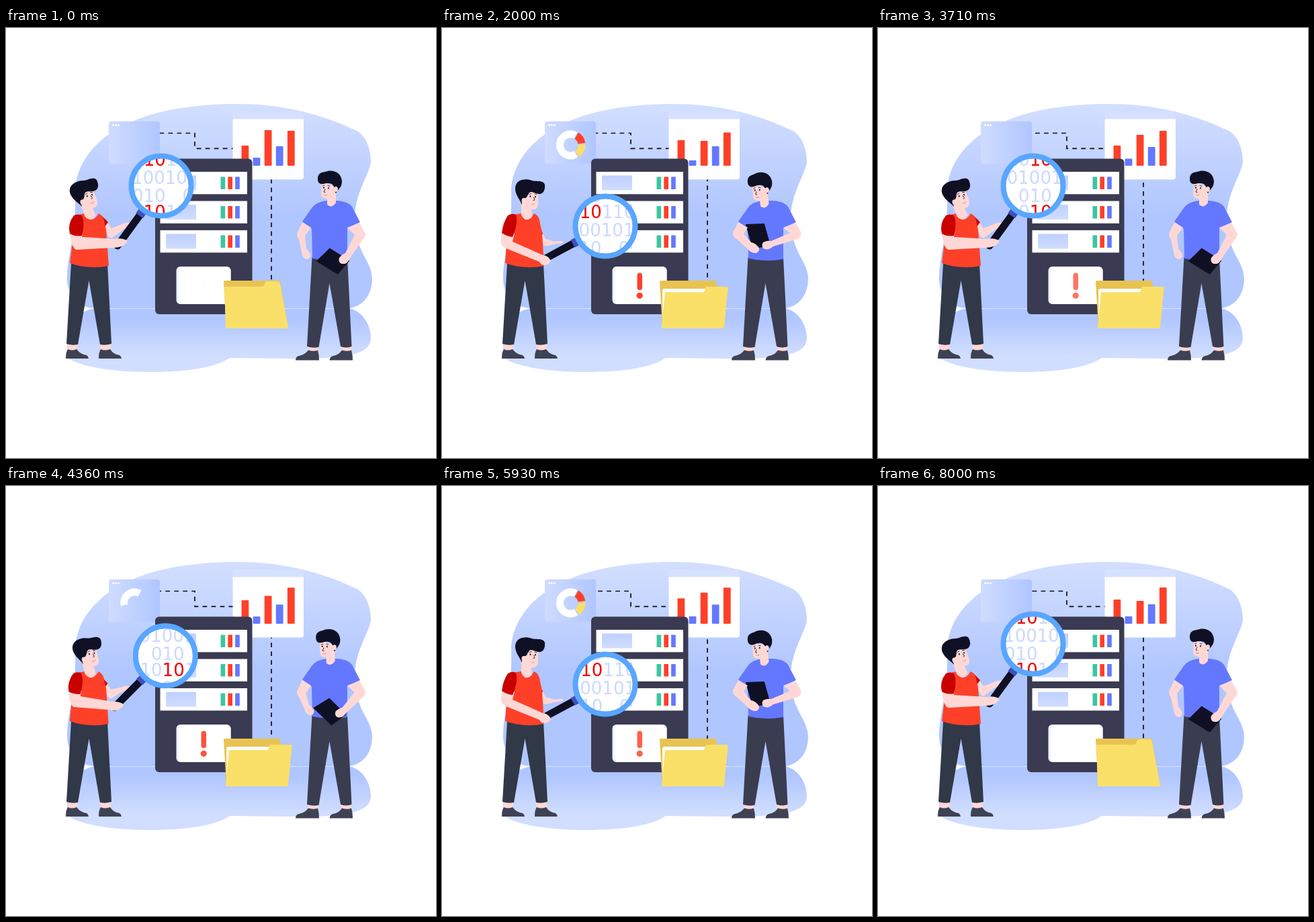
Animation of 640x640 px, one loop 8.07 s. Source, as an HTML page:

```html
<!DOCTYPE html>
<html lang="en">
<head>
<meta charset="utf-8">
<title>Data search</title>
<style>
html, body { margin: 0; width: 100%; height: 100%; overflow: hidden; background: #fff; }
svg { display: block; width: 100vw; height: 100vh; }
.skin { fill: #ffd8d6; }
.hair { fill: #0f1024; }
.digits { font: 26px "DejaVu Sans", sans-serif; fill: #cbd9ff; }
.digits tspan { fill: #f00000; }
.dash { fill: none; stroke: #0d0d18; stroke-width: 1.7; stroke-dasharray: 6.8 6.2; }
.face { fill: none; stroke: #232338; stroke-width: .9; stroke-linecap: round; }
</style>
</head>
<body>
<svg viewBox="0 0 640 640">
  <defs>
    <linearGradient id="sky" x2="0" y2="1">
      <stop stop-color="#d3dfff"/><stop offset=".55" stop-color="#b0c6ff"/>
    </linearGradient>
    <linearGradient id="ground" x2="0" y2="1">
      <stop offset=".15" stop-color="#b0c6ff"/><stop offset=".75" stop-color="#d1deff"/>
    </linearGradient>
    <linearGradient id="pane"><stop stop-color="#cfdcff"/><stop offset="1" stop-color="#b0c6ff"/></linearGradient>
    <linearGradient id="slot" x2="0" y2="1"><stop stop-color="#bfd0ff"/><stop offset="1" stop-color="#d0ddff"/></linearGradient>
    <clipPath id="glass"><circle id="glassCircle" r="41"/></clipPath>
  </defs>

  <path fill="url(#sky)" d="M131 417C108 416 91 398 91 372C91 335 105 315 103 240C107 183 165 113 345 113C430 113 490 138 522 153C538 162 543 184 543 199C542 215 520 245 519 280C518 334 545 345 545 374C544 402 528 414 512 417Z"/>
  <path fill="url(#ground)" d="M131 417.500H512C532 422 543 444 543 461C543 484 515 493 420 492L333 491C313 505 270 512 215 512C160 512 110 504 94 492C90 480 89 460 94 447C103 430 115 420 131 417.500Z"/>

  <rect x="153" y="139" width="76" height="63" rx="4" fill="url(#pane)"/>
  <path d="M159.5 144.5h0m4 0h0m4 0h0" stroke="#fff" stroke-width="3.2" stroke-linecap="round"/>
  <g id="donut" fill="none" stroke-width="11"></g>

  <path class="dash" d="M229 156.5H281V179.3H338"/>
  <path class="dash" d="M395 225V377"/>
  <rect x="337.5" y="124" width="105.5" height="12" fill="#d6e1ff"/>
  <path fill="#fff" d="M337.5 135.5H443V222Q443 225.5 439 225.5H341Q337.5 225.5 337.5 222Z"/>
  <g id="bars"></g>

  <rect x="222" y="194.5" width="144.5" height="231.5" rx="6" fill="#3a3b52"/>
  <g id="rows"></g>
  <rect x="253.5" y="355" width="81" height="56" rx="6" fill="#f0f4ff"/>
  <rect x="257.5" y="356" width="77" height="54.5" rx="5" fill="#fff"/>
  <g id="alert" fill="#ff4029">
    <rect x="290.5" y="364.5" width="7.5" height="25.5" rx="3.5"/><circle cx="294.2" cy="398.3" r="4.6"/>
  </g>

  <path fill="#e9c351" d="M324 378Q324 376 326 376H406Q408 376 408 378L420 447H328Z"/>
  <path fill="#fff" d="M328 391Q328 388 331 388H393V398H334L328.5 440Z"/>
  <path id="folder" fill="#fae069"/>

  <!-- left man -->
  <path class="skin" d="M92 469H107L105 480H92ZM140 469H156V480H141Z"/>
  <path fill="#313848" d="M97 350L90 470Q98 473 107 471L123.5 376L140 471Q148 473 157 470L151 350Z"/>
  <path fill="#3f4254" d="M89 492Q89 482 92 478Q98 481 105 478Q111 486 120 487Q123 489 123 492ZM138 492Q138 482 141 478Q147 481 155 478Q160 486 169 487Q172 489 172 492Z"/>
  <path id="farArm" class="skin"/>
  <path id="farSleeve" fill="#c90000"/>
  <path id="shirt" fill="#ff4029"/>
  <g id="leftHead">
    <path class="skin" d="M118 255V278Q124 291 134 281L133 270Q142 272 143 262V244L122 240Z"/>
    <path class="hair" d="M119 263C116 255 109 249 109 238C110 226 122 224 131 226C139 230 150 225 153 233C154 242 150 247 145 247C138 247 134 242 130 245C127 249 126 254 123 253C119 253 119 258 119 263Z"/>
    <ellipse class="skin" cx="121.5" cy="257" rx="3" ry="4"/>
    <path class="face" d="M130 247.5l3-1m5 .5l3 .8M136.5 252l1.5 4l-2 .5"/>
    <path d="M131.5 250.5v.5m7.5 0v.5" stroke="#17172a" stroke-width="2" stroke-linecap="round"/>
    <path d="M133 262q2.5 1.5 5-.5q-2 4-5 .5" fill="#fff" stroke="#ef7773" stroke-width=".5"/>
  </g>

  <!-- right man -->
  <path class="skin" d="M449 472H465V482H450ZM498 472H514V482H499Z"/>
  <path fill="#3a3c50" d="M455.5 341L448 474Q456 477 465.5 475L481.5 380L498 474Q506 477 514.5 474L508 341Z"/>
  <path fill="#3f4254" d="M431 494.5Q431 489 436 488Q444 487 450 479.5Q458 482 464 479.5Q466 486 466 494.5ZM481.5 494.5Q482 489 487 488Q495 487 500 479.5Q508 482 514 479.5Q516 486 516 494.5Z"/>
  <path fill="#6478ff" d="M477 257Q461 259 455 268L441 288L455 299L456 343Q482 349 508 344V298L527 289L515 266Q509 258 492 257Z"/>
  <g id="rightHead">
    <path class="skin" d="M470 230L469 247Q469 254 478 254V263Q485 269 491 260V236Z"/>
    <path class="hair" d="M464 225C464 217 468 215 475 214C484 210 499 213 500 228C500 238 494 240 491 246C488 242 490 238 488 236C485 230 480 231 476 231C468 234 464 231 464 225Z"/>
    <ellipse class="skin" cx="491" cy="240" rx="3" ry="4"/>
    <path class="face" d="M471.5 235l2.5-.8m5 .2l3 .8M475 240l-2 4l2 .6"/>
    <path d="M473 237.5v.5m7 0v.5" stroke="#17172a" stroke-width="1.9" stroke-linecap="round"/>
    <path d="M473 248q2 2 5 .5" fill="none" stroke="#ef7773" stroke-width=".9"/>
  </g>
  <path id="tablet" class="hair" stroke="#0f1024" stroke-width="2" stroke-linejoin="round" d="M-18 -17L8 -18L17 14L-8 17Z"/>
  <path id="hipArm" class="skin"/>
  <path id="holdArm" class="skin"/>

  <!-- magnifier -->
  <path id="handle" stroke="#0f1024" stroke-width="11" stroke-linecap="round"/>
  <path id="ferrule" stroke="#3f51bf" stroke-width="13"/>
  <g clip-path="url(#glass)">
    <rect x="150" y="150" width="180" height="220" fill="#fff"/>
    <g id="digits" class="digits"></g>
  </g>
  <circle id="ring" r="44.5" fill="none" stroke="#58a6ff" stroke-width="8"/>
  <path id="nearArm" class="skin"/>
  <path id="nearSleeve" fill="#c90000"/>
</svg>
<script>
const LOOP = 8070, RED = '#ff4029', BLUE = '#6478ff';
const $ = id => document.getElementById(id);
const clamp = x => Math.min(1, Math.max(0, x));
const ease = x => (x = clamp(x), x * x * (3 - 2 * x));
const lerp = (a, b, p) => a + (b - a) * p;
const set = (el, attrs) => { for (const k in attrs) el.setAttribute(k, attrs[k]); };

// Blend two paths that share the same commands.
function blend(a, b, p) {
  const ends = b.match(/[\d.]+/g);
  let i = 0;
  return a.replace(/[\d.]+/g, n => lerp(+n, +ends[i++], p).toFixed(2));
}

// Each part: pose with the lens raised, pose with the lens lowered.
const poses = {
  nearArm: [
    'M95 304Q97 328 105 330L160 327Q166 327 172 325Q182 320 180 316Q172 312 162 314L113 311L114 304Z',
    'M90 303Q84 322 93 327L145 348Q148 354 154 353Q163 350 161 345Q158 339 150 338L105 318L108 306Z'],
  nearSleeve: [
    'M101 279Q107 276 113 279Q118 290 113 309Q103 311 95 306Q91 292 101 279Z',
    'M98 279Q105 275 110 278Q114 290 105 311Q96 310 89 305Q91 289 98 279Z'],
  farArm: [
    'M144 292L151 307Q155 316 161 310L176 299Q186 294 186 290Q180 288 172 292L157 298L150 288Z',
    'M146 306L150 322Q153 326 158 324L170 321Q181 321 181 318Q176 316 168 318L154 314L149 304Z'],
  farSleeve: ['M142 279L152 289L147 296L141 290Z', 'M145 298L150 305L149 308L143 302Z'],
  shirt: [
    'M108 278L117 276Q127 294 138 276Q146 280 147 292L149 300L153 354Q124 360 95 350L98 325L106 300Z',
    'M105 278L118 276Q127 294 137 276Q145 279 146 291L149 304L152 354Q124 360 94 350L96 320L104 300Z'],
  hipArm: [
    'M441 289L433 306Q433 311 436 315L440 333Q441 343 447 344Q453 344 453 337Q450 331 447 329L445 309L454 297Z',
    'M441 289L433 304Q432 309 436 312L453 327Q460 336 468 335Q474 332 471 326Q466 320 460 319L449 306L455 297Z'],
  holdArm: [
    'M526 290L535 306Q535 311 531 315L511 344Q508 352 500 351Q494 349 496 342Q500 337 505 335L519 308L508 297Z',
    'M526 290L534 303Q536 310 530 314L493 325Q485 332 478 328Q475 323 478 319Q484 316 490 317L518 305L508 297Z']
};
const folderClosed = 'M325 385L381 385Q384 385 385 381Q386 377 388 377L405 377Q407 377 407.5 379L420 445Q420 447 418 447L329 447Q327 447 327 445Z';
const folderOpen = 'M332 393L388 393Q391 393 391 389Q392 385 394 385L423 385Q426 385 425.5 388L420 445Q420 447 418 447L329 447Q327 447 327 445Z';

// Server rows
const rect = (x, y, w, h, fill, rx = 0) =>
  `<rect x="${x}" y="${y}" width="${w}" height="${h}" rx="${rx}" fill="${fill}"/>`;
$('rows').innerHTML = [214, 257.5, 301].map(y =>
  rect(229.5, y, 129.5, 33.3, '#fff') + rect(238, y + 5.5, 45, 22, 'url(#slot)', 1) +
  ['#3cc6a0', RED, BLUE].map((c, i) => rect(319.5 + i * 10.8, y + 7.5, 6.7, 18.5, c, .5)).join('')).join('');

// Chart bars drift between these tops.
const barTimes = [0, 710, 2000, 3710, 4930, 6710, 8000];
const barTops = [
  [175, 172, 167, 175, 166, 168, 169],
  [193, 196, 197, 194.5, 194, 194, 194],
  [152, 162, 168, 159, 167, 153, 171],
  [176, 174, 176, 177, 176, 177, 176],
  [153, 149, 155.5, 153, 150, 152, 151]];
$('bars').innerHTML = barTops.map((_, i) => rect(350.5 + i * 17.1, 0, 10.8, 0, i % 2 ? BLUE : RED, 1)).join('');
const bars = [...$('bars').children];

const slices = [[0, 238, '#fff'], [242, 300, '#fadf66'], [306, 357, RED]];
$('donut').innerHTML = slices.map(s => `<path stroke="${s[2]}"/>`).join('');

$('digits').innerHTML = [0, 78.5].map(y =>
  `<text x="138.5" y="${204.5 + y}">0110<tspan>10</tspan>1101</text>` +
  `<text x="121" y="${231.5 + y}">01101001010</text>` +
  `<text x="188" y="${258.5 + y}">010\u00a0\u00a0\u00a00</text>`).join('');

function drawDonut(u) {
  const from = 360 * clamp((u - 2000) / 1000), to = 360 * clamp(u / 1000);
  const at = (deg, c) => {
    const r = (-62 - deg) * Math.PI / 180;
    return `${c + 16 * Math.cos(r)} ${174 + 16 * Math.sin(r)}`;
  };
  slices.forEach(([s, e], i) => {
    const a = Math.max(s, from), b = Math.min(e, to), c = i ? 192 : 191.5;
    $('donut').children[i].setAttribute('d',
      b > a ? `M${at(a, c)}A16 16 0 ${+(b - a > 180)} 0 ${at(b, c)}` : '');
  });
}

function drawLens(p) {
  const x = lerp(231, 243, p) + 13 * p * (1 - p), y = lerp(235, 295, p);
  const ex = lerp(166, 156, p) - 8 * p * (1 - p), ey = lerp(324, 342, p);
  const d = Math.hypot(ex - x, ey - y), ux = (ex - x) / d, uy = (ey - y) / d;
  const on = r => `${x + ux * r} ${y + uy * r}`;
  set($('ring'), { cx: x, cy: y });
  set($('glassCircle'), { cx: x, cy: y });
  set($('handle'), { d: `M${on(56)}L${ex} ${ey}` });
  set($('ferrule'), { d: `M${on(46)}L${on(55)}` });
}

function draw(t) {
  const u = t % 4000;
  const p = u < 2000 ? ease(u / 1000) : 1 - ease((u - 2000) / 1000);
  for (const id in poses) $(id).setAttribute('d', blend(...poses[id], p));
  set($('leftHead'), { transform: `translate(${-2 * (1 - p)}) rotate(${-20 * (1 - p)} 126 275)` });
  set($('rightHead'), { transform: `translate(${-4 * p} ${2 * p}) rotate(${-8 * p} 484 262)` });
  set($('tablet'), { transform: `translate(${lerp(488, 471, p)} ${lerp(347.5, 310, p)}) rotate(${-42 * (1 - p)})` });
  drawLens(p);
  drawDonut(u);

  const open = t < 4000 ? ease(t / 700) : 1 - ease((t - 7000) / 700);
  $('folder').setAttribute('d', blend(folderClosed, folderOpen, open));
  set($('alert'), { opacity: 1 - Math.abs(t % 800 - 400) / 400 });
  set($('digits'), { transform: `translate(${17 * (1 - Math.cos(t * Math.PI / 500))})` });
  document.querySelectorAll('.dash').forEach(el => set(el, { 'stroke-dashoffset': .5 - t * .005 }));

  let k = 0;
  while (k < 5 && t >= barTimes[k + 1]) k++;
  const q = ease((t - barTimes[k]) / (barTimes[k + 1] - barTimes[k]));
  bars.forEach((bar, i) => {
    const y = lerp(barTops[i][k], barTops[i][k + 1], q);
    set(bar, { y, height: 205 - y });
  });
}

const start = performance.now();
function tick() {
  draw(Math.min(8000, (performance.now() - start) % LOOP));
  requestAnimationFrame(tick);
}
tick();
</script>
</body>
</html>
```
